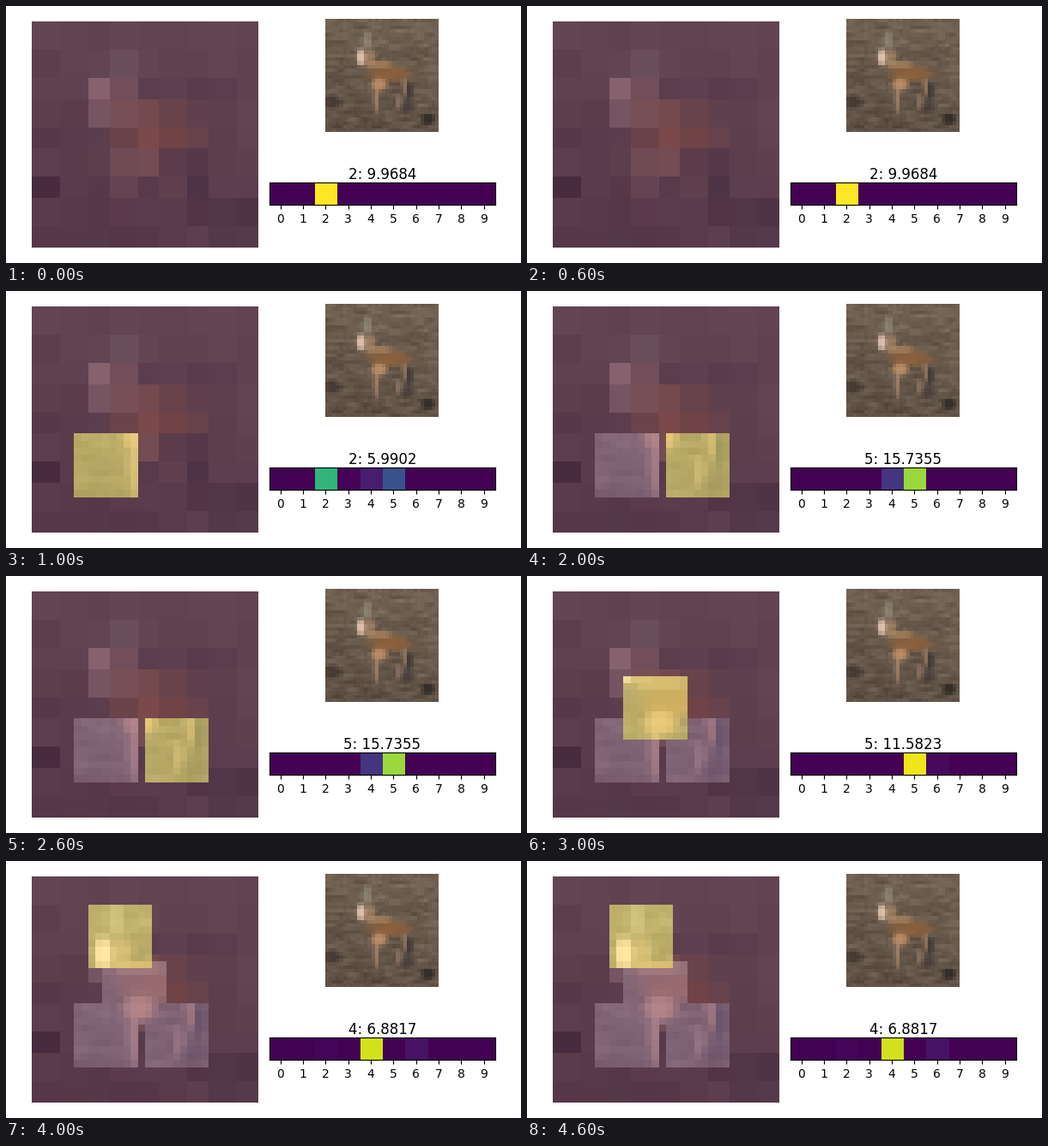
Animation of 600x300 px, one loop 5000 ms. Source, as a matplotlib script:

```python
import matplotlib.pyplot as plt
import numpy as np
from matplotlib.animation import FuncAnimation

W, H, N = 600, 300, 32
PATCH = 9
LOW = np.array([68, 1, 84])
HIGH = np.array([253, 231, 37])
EDGES = [0, 4, 8, 11, 15, 18, 22, 25, 29]

# Soft shapes: centre x, y, radius x, y, opacity, colour
SHAPES = [
    (3, 7, 4, 1.5, .4, "#56463a"),
    (22, 9.5, 7, 1.5, .35, "#584840"),
    (4, 16.5, 7, 1.4, .5, "#54443a"),
    (2, 23.5, 2.8, 1.8, .75, "#3e332e"),
    (10.5, 23, 2.2, 1.1, .4, "#584840"),
    (30.5, 16, 2, 7, .3, "#84705e"),
    (29, 28.3, 1.8, 1.6, .85, "#2b2622"),
    (23.5, 20.5, 1.3, 3, .75, "#383436"),
    (23, 25, 2, 1.6, .6, "#40383a"),
    (11.8, 6, 1.3, 2.4, .55, "#a09c88"),
    (18.3, 15.5, 6.2, 2.3, .8, "#94623a"),
    (15.5, 12.9, 3.8, 1, .7, "#b48a62"),
    (15.2, 18.6, 2.4, 1.9, .85, "#c8946a"),
    (12.5, 11.3, 1.8, 2.8, .65, "#b4906e"),
    (10.1, 10.9, 1.3, 2.4, .9, "#ecccb8"),
    (14.3, 22.5, .8, 4.6, .7, "#b08a70"),
    (22.3, 19.5, .8, 2.4, .7, "#a88468"),
    (20.8, 23.5, .8, 2.4, .6, "#a08270"),
]


def rgb(code):
    return np.array([int(code[i:i + 2], 16) for i in (1, 3, 5)], float)


def soil_grain():
    noise = np.random.default_rng(4).normal(0, 7, (N, N + 2))
    return (noise[:, :-2] + noise[:, 1:-1] + noise[:, 2:])[..., None] / 2


def make_photo():
    y, x = np.mgrid[:N, :N] + .5
    t = (y / N)[..., None]
    img = rgb("#706152") * (1 - t) + rgb("#5f5145") * t + soil_grain()
    for cx, cy, rx, ry, alpha, code in SHAPES:
        r2 = ((x - cx) / rx) ** 2 + ((y - cy) / ry) ** 2
        w = alpha * np.exp(-r2 ** 2)[..., None]
        img = img * (1 - w) + rgb(code) * w
    return np.clip(img, 0, 255)


def make_coarse(img):
    size = np.diff(EDGES + [N])
    total = np.add.reduceat(np.add.reduceat(img, EDGES, 0), EDGES, 1)
    mean = total / np.outer(size, size)[..., None]
    return mean.repeat(size, 0).repeat(size, 1)


def tint(img, colour):
    return .7 * img + .3 * colour


def to_image(img):
    return np.clip(img, 0, 255).astype(np.uint8)


photo = make_photo()
bright = np.clip(photo * .85 + 70, 0, 255)
coarse = make_coarse(photo)

# Top left corner of each glimpse
GLIMPSES = [(6, 18), (16, 18), (10, 12), (8, 4)]

# Label, score and class probabilities of each step
STEPS = [
    (2, "9.9684", {2: 1}),
    (2, "5.9902", {2: .66, 3: .01, 4: .08, 5: .25}),
    (5, "15.7355", {4: .15, 5: .85}),
    (5, "11.5823", {5: .975, 6: .025}),
    (4, "6.8817", {2: .015, 4: .93, 6: .05}),
]


def glimpse_view(step):
    img = tint(coarse, LOW)
    for k, (x, y) in enumerate(GLIMPSES[:step], 1):
        box = np.s_[y:y + PATCH, x:x + PATCH]
        img[box] = tint(bright[box], HIGH if k == step else LOW)
    return to_image(img)


def prob_row(step):
    row = np.zeros((1, 10))
    for k, p in STEPS[step][2].items():
        row[0, k] = p
    return row


def title_text(step):
    label, score, _ = STEPS[step]
    return f"{label}: {score}"


plt.rcParams["font.family"] = "DejaVu Sans"
fig = plt.figure(figsize=(W / 100, H / 100), dpi=100, facecolor="white")
grid = fig.add_gridspec(2, 2, left=.05, right=.95, bottom=.05, top=.95,
                        wspace=.05, hspace=.05)

view_ax = fig.add_subplot(grid[:, 0])
view = view_ax.imshow(glimpse_view(0), interpolation="nearest")
view_ax.axis("off")

photo_ax = fig.add_subplot(grid[0, 1])
photo_ax.imshow(to_image(photo), interpolation="nearest")
photo_ax.axis("off")

bar_ax = fig.add_subplot(grid[1, 1])
bar = bar_ax.imshow(prob_row(0), cmap="viridis", vmin=0, vmax=1,
                    interpolation="nearest")
bar_ax.set_xticks(range(10))
bar_ax.set_yticks([])
title = bar_ax.set_title(title_text(0), fontsize=12, pad=0)


def update(step):
    view.set_data(glimpse_view(step))
    bar.set_data(prob_row(step))
    title.set_text(title_text(step))
    return view, bar, title


anim = FuncAnimation(fig, update, frames=len(STEPS), interval=1000,
                     repeat=True, repeat_delay=0)
plt.show()
```
